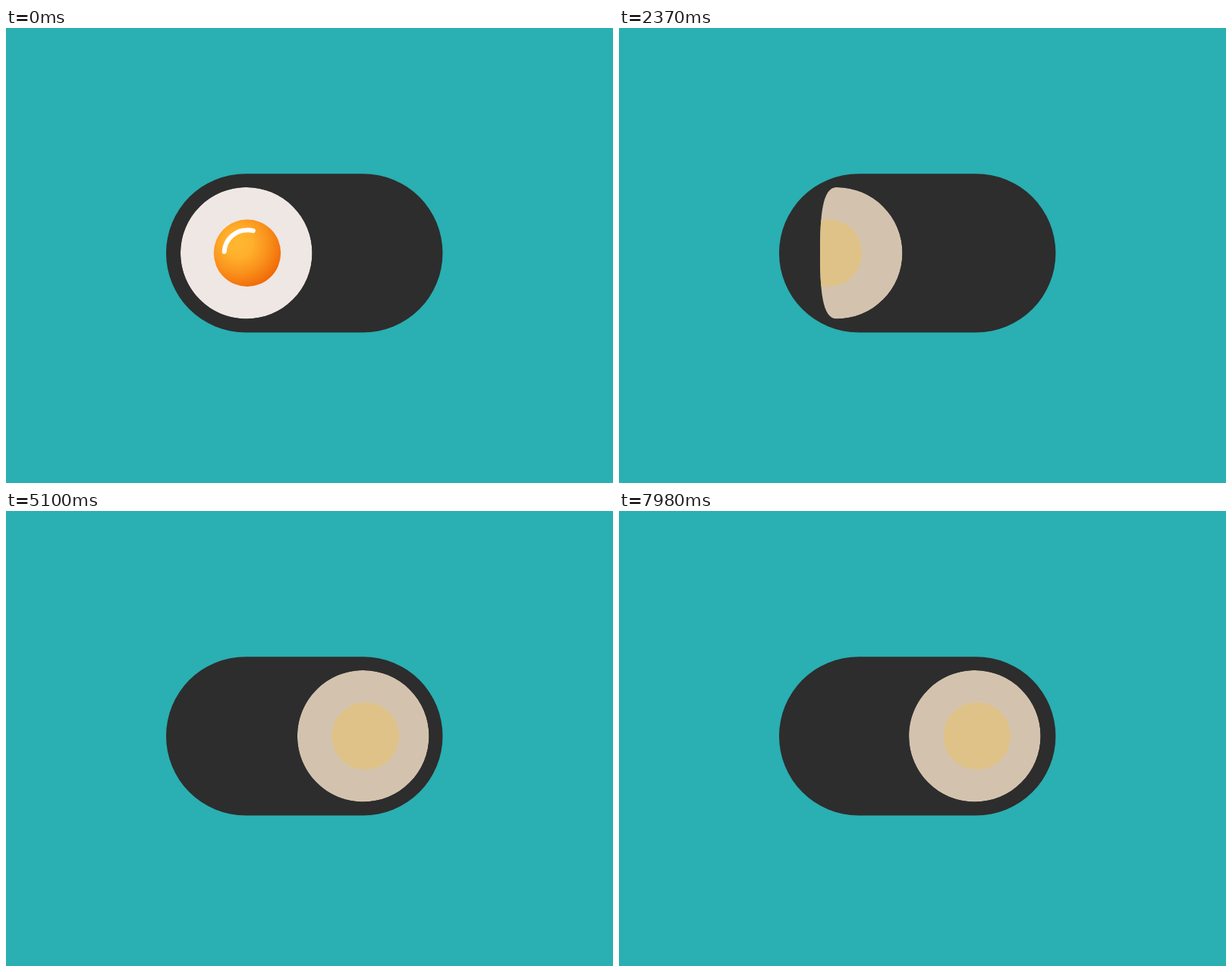
These frames come from a looping animation (800 px wide and 600 px high, 8000 ms). An HTML page with a canvas:

```html
<!DOCTYPE html>
<html lang="en">
<head>
<meta charset="utf-8">
<title>Egg toggle</title>
<style>
html, body { margin: 0; width: 100%; height: 100%; overflow: hidden; background: #2aafb2; }
canvas { display: block; }
</style>
</head>
<body>
<canvas id="stage" width="800" height="600"></canvas>
<script>
const ctx = document.getElementById('stage').getContext('2d');
const LOOP = 8000, STEP = 30;
const STARTS = [120, 2190, 3810, 5700, 7410]; // alternately right, left
const LEFT = 316.75, TRAVEL = 154, CY = 296.75, R = 86.75, K = 47.9;

function disc(x, r, fill) {
  ctx.beginPath();
  ctx.arc(x, CY, r, 0, Math.PI * 2);
  ctx.fillStyle = fill;
  ctx.fill();
}

function flipEase(t) {
  const u = Math.min(t / 360, 1);
  return u < 0.5 ? (2 * u) ** 3.3 / 2 : 1 - (2 - 2 * u) ** 3.3 / 2;
}

// Constant speed, then a springy stop
function slideRight(t) {
  if (t < 285) return t / 285;
  const s = (t - 285) / 1000;
  return 1 + 8.2 / TRAVEL * Math.sin(2.8 * 2 * Math.PI * s) * Math.exp(-5 * s);
}

// Constant speed, then a soft stop
function slideLeft(t) {
  return t < 242 ? t / 285 : 1 - 0.15 * Math.exp((242 - t) / 43);
}

function pose(time) {
  const i = STARTS.findLastIndex(start => time >= start);
  if (i < 0) return [0, 0];
  const t = time - STARTS[i];
  return i % 2 ? [1 - slideLeft(t), 1 - flipEase(t)] : [slideRight(t), flipEase(t)];
}

// Disc whose left side is pushed in, so that it reaches only a to the left
function outline(x, a) {
  const k = Math.min(K, 0.88 * a);
  ctx.beginPath();
  ctx.arc(x, CY, R, -Math.PI / 2, Math.PI / 2);
  ctx.bezierCurveTo(x - k, CY + R, x - a, CY + K, x - a, CY);
  ctx.bezierCurveTo(x - a, CY - K, x - k, CY - R, x, CY - R);
  ctx.closePath();
}

function drawFront(x) {
  disc(x, R, '#eee7e3');
  const cx = x + 1.2;
  const g = ctx.createRadialGradient(cx - 12, CY - 13, 0, cx - 12, CY - 13, 62);
  g.addColorStop(0, '#ffb732');
  g.addColorStop(0.3, '#ffb02c');
  g.addColorStop(0.65, '#f9901b');
  g.addColorStop(1, '#f06807');
  disc(cx, 44.2, g);
  ctx.beginPath();
  ctx.arc(cx, CY, 30.3, Math.PI + 0.06, Math.PI * 1.5 + 0.26);
  ctx.strokeStyle = '#fff';
  ctx.lineWidth = 6;
  ctx.lineCap = 'round';
  ctx.stroke();
}

function drawBack(x, flip) {
  disc(x, R, '#d3c3ae');
  disc(x + 3 - 28 * (1 - flip), 44.4, '#dec288');
}

function draw(time) {
  const [slide, flip] = pose(time);
  const x = LEFT + TRAVEL * slide;
  const front = x - 2 * R * flip;
  const back = x - 2 * R * (1 - flip);

  ctx.fillStyle = '#2aafb2';
  ctx.fillRect(0, 0, 800, 600);
  ctx.beginPath();
  ctx.roundRect(211, 192.2, 364.5, 209.2, 104.6);
  ctx.fillStyle = '#2d2d2d';
  ctx.fill();

  ctx.save();
  outline(Math.max(front, back), R - 130 * Math.min(flip, 1 - flip));
  ctx.clip();
  if (flip < 0.5) drawFront(front);
  if (flip > 0) drawBack(back, flip);
  ctx.restore();
}

function tick() {
  const time = performance.now() % LOOP;
  draw(Math.floor(time / STEP) * STEP);
  requestAnimationFrame(tick);
}
tick();
</script>
</body>
</html>
```
